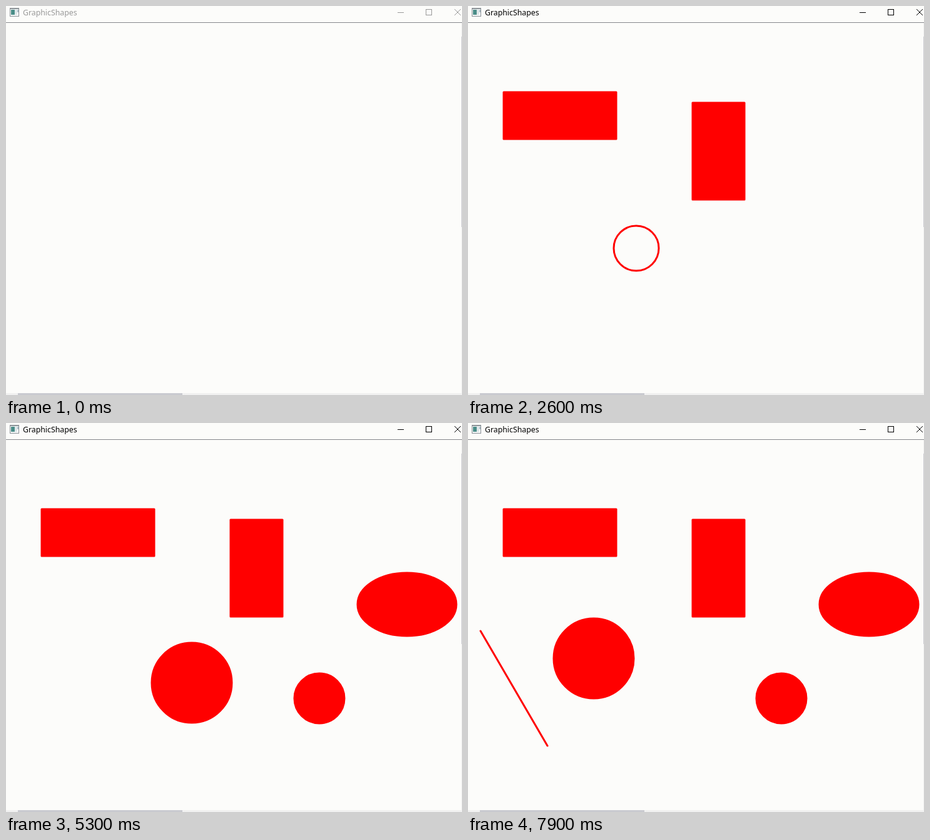
Recreate the animation shown at these times as an HTML page. Size 729 by 623 pixels, loop 8 s.

```html
<!DOCTYPE html>
<html lang="en">
<head>
<meta charset="utf-8">
<title>GraphicShapes</title>
<style>
  html, body { margin: 0; width: 100%; height: 100%; overflow: hidden; background: #fcfcfa; }
  svg { display: block; width: 729px; height: 623px; }
  #title { font: 12.3px "Noto Sans", "Open Sans", sans-serif; }
  #shapes { stroke: #f00; stroke-width: 3; stroke-linejoin: round; stroke-linecap: round; }
</style>
</head>
<body>
<svg viewBox="0 0 729 623">
  <rect width="729" height="623" fill="#fcfcfa"/>
  <g shape-rendering="crispEdges">
    <rect y="26" width="729" height="1" fill="#85878b"/>
    <rect x="728" y="27" width="1" height="596" fill="#f0f0f0"/>
    <rect x="728" y="49" width="1" height="305" fill="#c9cad0"/>
    <rect y="620" width="729" height="3" fill="#f0f0f0"/>
    <rect x="19" y="620" width="263" height="3" fill="#c9cad0"/>
  </g>
  <g shape-rendering="crispEdges">
    <rect x="6" y="3" width="15" height="14" fill="#8b9297"/>
    <rect x="7" y="5" width="13" height="11" fill="#f4f6f7"/>
    <rect x="8" y="6" width="6" height="8" fill="#4a8d88"/>
    <rect x="15" y="6" width="2" height="8" fill="#d3e0e2"/>
    <rect x="18" y="6" width="2" height="4" fill="#a9bcc8"/>
  </g>
  <text id="title" x="27" y="15">GraphicShapes</text>
  <g id="buttons" fill="none">
    <path d="M626 10.5h10M671.5 5.5h9v9h-9z" shape-rendering="crispEdges"/>
    <path d="M717 5l10 10M727 5l-10 10"/>
  </g>
  <g id="shapes"></g>
</svg>
<script>
const LOOP = 8000, STEP = 100, ACTIVE_AT = 400;
const title = document.getElementById('title');
const buttons = document.getElementById('buttons');
const layer = document.getElementById('shapes');

// A drag pulls the free corner from `first` to `last`; `bow` bends its path downward.
const shapes = [
  { tag: 'rect', x: 57, y: 138, first: [82, 34], last: [180, 75], from: 400, to: 600, fill: 600 },
  { tag: 'rect', x: 359, y: 155, first: [42, 76], last: [83, 155], from: 1100, to: 1300, fill: 1300 },
  { tag: 'ellipse', x: 233, y: 352, first: [72, 72], last: [128, 128], from: 2600, to: 2700, fill: 3100,
    move: { dx: -96, dy: -39, from: 7500, to: 7900 } },
  { tag: 'ellipse', x: 461, y: 401, first: [42, 42], last: [80, 80], from: 3600, to: 3800, fill: 3800 },
  { tag: 'ellipse', x: 562, y: 240, first: [62, 62], last: [158, 101], bow: 24, from: 4600, to: 5200, fill: 5300 },
  { tag: 'line', x: 20, y: 333, first: [15, 51], last: [107, 184], from: 6600, to: 7000, fill: LOOP }
];

const geometry = {
  rect: (x, y, w, h) => ({ x, y, width: w, height: h }),
  ellipse: (x, y, w, h) => ({ cx: x + w / 2, cy: y + h / 2, rx: w / 2, ry: h / 2 }),
  line: (x, y, w, h) => ({ x1: x, y1: y, x2: x + w, y2: y + h })
};

const progress = (t, { from, to }) => Math.min(1, Math.max(0, (t - from) / (to - from)));
const easeOut = k => 1 - (1 - k) ** 2;
const smooth = k => k * k * (3 - 2 * k);
const mix = (a, b, k) => a + (b - a) * k;

const setAttrs = (el, attrs) => {
  for (const key in attrs) el.setAttribute(key, attrs[key]);
};

for (const s of shapes) {
  s.el = document.createElementNS('http://www.w3.org/2000/svg', s.tag);
  layer.append(s.el);
}

function drawShape(s, t) {
  const k = progress(t, s), e = easeOut(k);
  const w = mix(s.first[0], s.last[0], e);
  const h = mix(s.first[1], s.last[1], e) + (s.bow || 0) * Math.sin(Math.PI * k);
  const m = s.move ? smooth(progress(t, s.move)) : 0;
  const x = m ? s.x + s.move.dx * m : s.x;
  const y = m ? s.y + s.move.dy * m : s.y;
  setAttrs(s.el, {
    ...geometry[s.tag](x, y, w, h),
    visibility: t < s.from ? 'hidden' : 'visible',
    fill: t < s.fill ? 'none' : '#f00'
  });
}

function draw(t) {
  const ink = t < ACTIVE_AT ? '#999' : '#000';
  title.setAttribute('fill', ink);
  buttons.setAttribute('stroke', ink);
  for (const s of shapes) drawShape(s, t);
}

const start = performance.now();
function tick() {
  const t = (performance.now() - start) % LOOP;
  draw(Math.floor(t / STEP) * STEP);
  requestAnimationFrame(tick);
}
tick();
</script>
</body>
</html>
```
